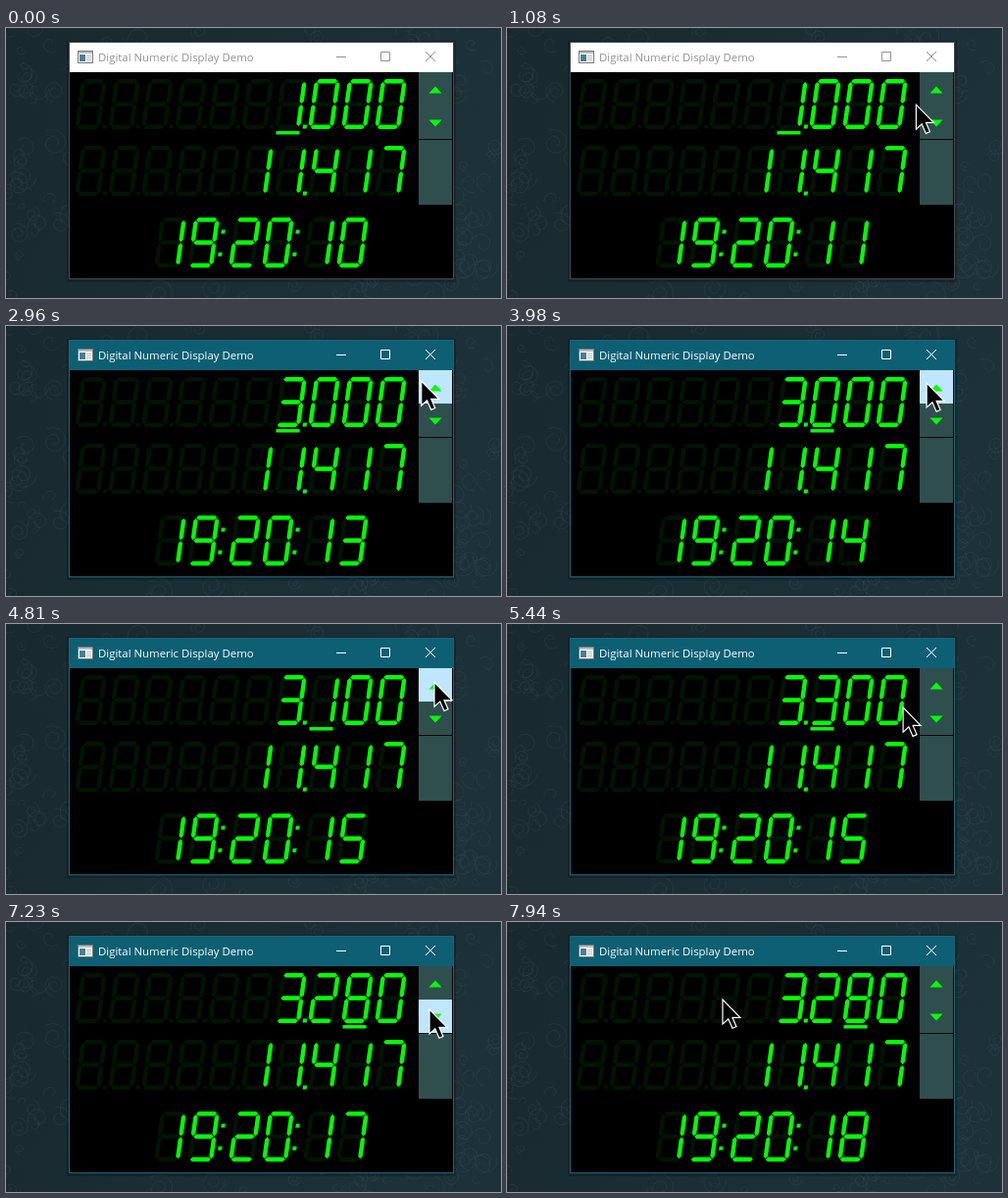
An HTML page that plays this animation: 505x275 px, repeating every 8 s.

```html
<!DOCTYPE html>
<html lang="en">
<head>
<meta charset="utf-8">
<title>Digital Numeric Display Demo</title>
<style>
html, body { margin: 0; width: 100%; height: 100%; overflow: hidden; background: #1a2c33; }
svg { display: block; }
text { font: 11.4px "Open Sans", "Noto Sans", sans-serif; }
</style>
</head>
<body>
<svg width="505" height="275" viewBox="0 0 505 275">
  <defs>
    <linearGradient id="wall" x2="1" y2=".3">
      <stop offset="0" stop-color="#18292f"/>
      <stop offset="1" stop-color="#1c3138"/>
    </linearGradient>
  </defs>
  <rect width="505" height="275" fill="url(#wall)"/>
  <path id="doodles" fill="none" stroke="#7fa0a8" stroke-opacity=".1"/>
  <rect x="62" y="13" width="397" height="246" fill="#000" opacity=".2"/>
  <rect id="frame" x="64.5" y="14.5" width="392" height="241"/>
  <rect id="bar" x="65" y="15" width="391" height="30"/>
  <g shape-rendering="crispEdges">
    <rect x="73" y="23" width="16" height="13" fill="#777"/>
    <rect x="74" y="24" width="14" height="11" fill="#fff"/>
    <rect x="74" y="24" width="14" height="2" fill="#b5bec4"/>
    <rect x="75" y="27" width="6" height="7" fill="#4c7f91"/>
    <path d="M82 28.5h5M82 30.5h5M82 32.5h5" stroke="#bbb"/>
  </g>
  <text id="title" x="94" y="34">Digital Numeric Display Demo</text>
  <path id="controls" d="M337 29.5h10M382.5 24.5h9v9h-9zM428 24l10 10M438 24l-10 10" fill="none"/>
  <path id="ghost" fill="#001500"/>
  <path id="lit" fill="#0f0"/>
  <rect id="mark" y="105" width="24" height="3.5" fill="#0f0"/>
  <g fill="#2f4f4f">
    <rect id="up" x="421" y="45" width="34" height="34"/>
    <rect id="down" x="421" y="79" width="34" height="34"/>
    <rect x="421" y="114" width="34" height="66"/>
  </g>
  <path d="M431.5 66.5h13l-6.5-7zM431.5 93.5h13l-6.5 7z" fill="#0f0"/>
  <path id="cursor" d="M0 0V25L5.8 19.7L10 29.3L14 27.5L10 18.3H18Z" fill="#000" stroke="#fff" stroke-width="1.2"/>
</svg>
<script>
const LOOP = 8000, TALL = 51, SLANT = 7, PITCH = 34;
const el = id => document.getElementById(id);
const set = (id, attrs) => {
  for (const key in attrs) el(id).setAttribute(key, attrs[key]);
};

// Segment outlines on an upright 26 x 51 cell
const T = 2.2;
const across = (a, b, y) => [[a, y], [a + T, y - T], [b - T, y - T], [b, y], [b - T, y + T], [a + T, y + T]];
const along = (x, a, b) => across(a, b, x).map(([u, v]) => [v, u]);
const box = (x, y) => [[x, y], [x + 4, y], [x + 4, y + 4], [x, y + 4]];
const SEGMENTS = {
  a: across(2.5, 23.5, T), b: along(23.8, 3, 25), c: along(23.8, 26, 48),
  d: across(2.5, 23.5, TALL - T), e: along(T, 26, 48), f: along(T, 3, 25),
  g: across(2.8, 23.2, 25.5)
};
const DIGITS = ["abcdef", "bc", "abged", "abgcd", "fgbc", "afgcd", "afgedc", "abc", "abcdefg", "abcdfg"];
const POINT = box(28.5, 46.5);
const COLON = [box(29.5, 12.5), box(29.5, 35.5)];

const poly = (shape, x, y) => "M" + shape.map(([u, v]) =>
  `${(x + u + (TALL - v) * SLANT / TALL).toFixed(2)} ${(y + v).toFixed(2)}`).join("L") + "Z";
const digit = (n, x, y) => [...DIGITS[n]].map(s => poly(SEGMENTS[s], x, y)).join("");
const column = i => 70 + PITCH * i;
const timeX = i => 151 + 76 * (i >> 1) + PITCH * (i & 1);

// Number with three decimals, right-aligned in ten cells
function number(thousandths, y) {
  const chars = String(thousandths), first = 10 - chars.length;
  return [...chars].map((c, i) => digit(+c, column(first + i), y)).join("") + poly(POINT, column(6), y);
}

function clock(seconds) {
  const colons = [1, 3].map(i => COLON.map(c => poly(c, timeX(i), 193)).join("")).join("");
  return [..."1920" + seconds].map((c, i) => digit(+c, timeX(i), 193)).join("") + colons;
}

function ghosts() {
  let d = "";
  for (const y of [52, 120])
    for (let i = 0; i < 10; i++) d += digit(8, column(i), y) + (i < 9 ? poly(POINT, column(i), y) : "");
  for (let i = 0; i < 6; i++) d += digit(8, timeX(i), 193);
  return d;
}

function doodles() {
  let seed = 7, d = "";
  const rnd = n => (seed = seed * 16807 % 2147483647) / 2147483647 * n;
  for (let i = 0; i < 230; i++) {
    const x = rnd(505), y = rnd(275), r = 4 + rnd(11), start = rnd(6.3), turns = 4 + rnd(7);
    for (let k = 0; k <= 20; k++) {
      const q = r * (1 - k / 26), a = start + turns * k / 20;
      d += (k ? "L" : "M") + (x + q * Math.cos(a)).toFixed(1) + " " + (y + q * Math.sin(a)).toFixed(1);
    }
  }
  return d;
}

// Pointer path: time, x, y
const PATH = [
  [290, 295, 218], [850, 411, 88], [1020, 411, 88], [1230, 433, 54], [2400, 433, 54],
  [2640, 428, 56], [2900, 428, 56], [2960, 424, 56], [3350, 322, 80], [3720, 333, 82],
  [3810, 333, 82], [3980, 428, 58], [4120, 443, 59], [4440, 443, 59], [4670, 437, 59],
  [5300, 437, 60], [5440, 404, 85], [5580, 419, 95], [5670, 419, 95], [5900, 383, 93],
  [6050, 383, 93], [6200, 366, 80], [6370, 366, 80], [6600, 432, 89], [7390, 432, 89],
  [7940, 220, 79], [8000, 220, 79]
];
const TICKS = [580, 1590, 2600, 3610, 4620, 5670, 6600, 7620];
const VALUES = [[0, 1000], [1400, 2000], [2480, 3000], [4520, 3100], [4860, 3200], [5080, 3300], [6860, 3290], [7230, 3280]];
const MARKS = [[0, 6], [3400, 7], [6080, 8]];
const latest = (list, t) => list.filter(([at]) => at <= t).pop()[1];

function pointer(t) {
  const i = PATH.findIndex(k => k[0] > t);
  if (i < 1) return null;
  const [t0, x0, y0] = PATH[i - 1], [t1, x1, y1] = PATH[i];
  const k = (t - t0) / (t1 - t0);
  return [x0 + (x1 - x0) * k, y0 + (y1 - y0) * k];
}

function draw(t) {
  const active = t >= 1300, at = pointer(t);
  set("frame", { stroke: active ? "#1b6575" : "#444b4e" });
  set("bar", { fill: active ? "#0d5f73" : "#fff" });
  set("title", { fill: active ? "#fff" : "#929292" });
  set("controls", { stroke: active ? "#fff" : "#929292" });

  const seconds = 10 + TICKS.filter(at => at <= t).length;
  set("lit", { d: number(latest(VALUES, t), 52) + number(11417, 120) + clock(seconds) });
  set("mark", { x: column(latest(MARKS, t)) + 1.5 });

  const hover = top => at && at[0] >= 421 && at[0] < 455 && at[1] >= top && at[1] < top + 34;
  set("up", { fill: hover(45) ? "#bee6fd" : "#2f4f4f" });
  set("down", { fill: hover(79) ? "#bee6fd" : "#2f4f4f" });
  set("cursor", at ? { visibility: "visible", transform: `translate(${at})` } : { visibility: "hidden" });
}

set("doodles", { d: doodles() });
set("ghost", { d: ghosts() });
const begin = performance.now();
function run() {
  draw((performance.now() - begin) % LOOP);
  requestAnimationFrame(run);
}
run();
</script>
</body>
</html>
```
